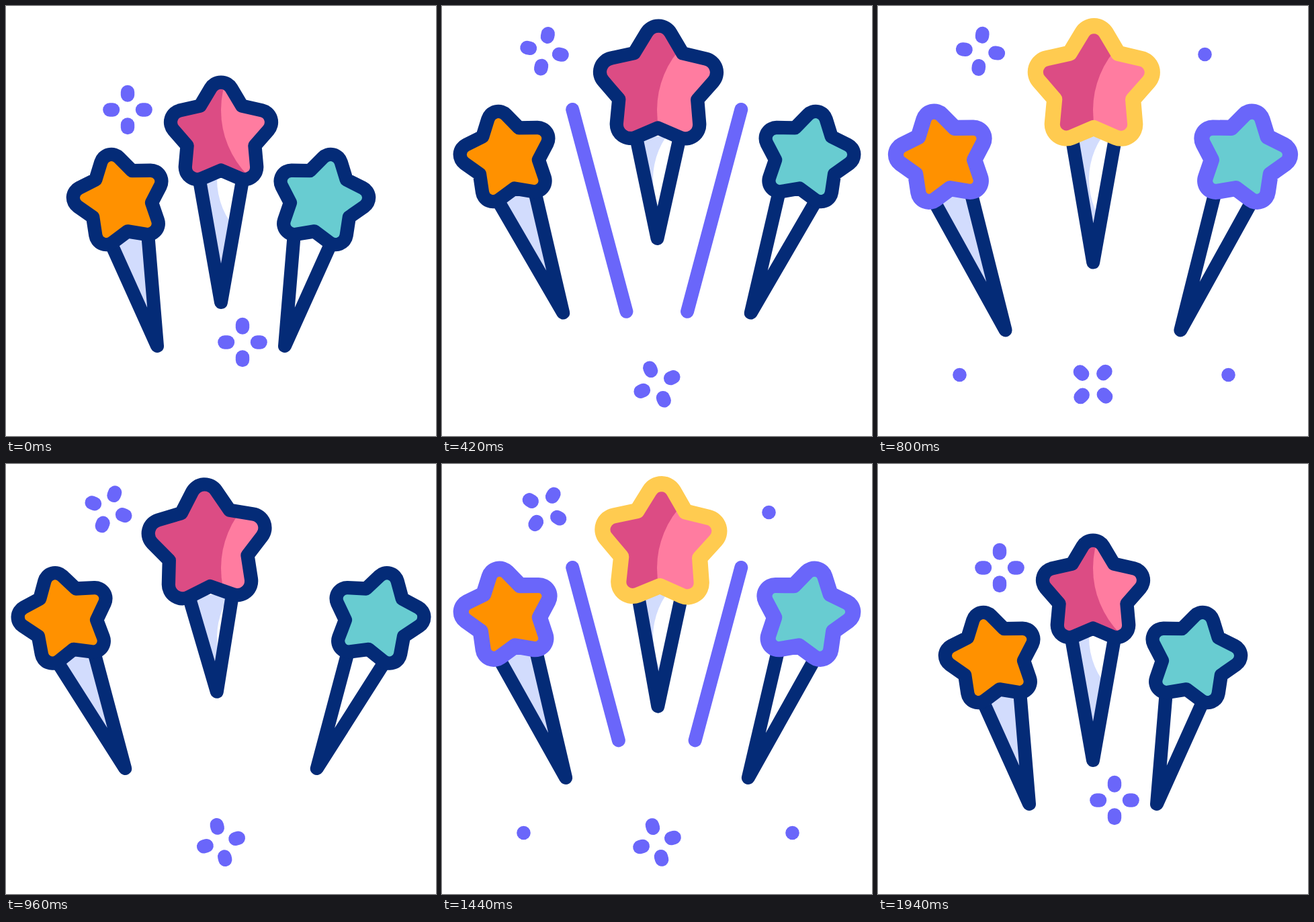
Write an HTML page that moves like this. It is 640x640 px and loops after 2280 ms.

```html
<!DOCTYPE html>
<html lang="en">
<head>
<meta charset="utf-8">
<title>Fireworks</title>
<style>
  html, body { margin: 0; width: 100%; height: 100%; overflow: hidden; background: #fff; }
  svg { display: block; width: 100%; height: 100%; }
</style>
</head>
<body>
<svg id="stage" viewBox="0 0 640 640" stroke-linecap="round" stroke-linejoin="round"></svg>
<script>
const LOOP = 2280, STEP = 20;
const NAVY = '#042b77', VIOLET = '#6a66fa', YELLOW = '#ffcb50', LAVENDER = '#d2dcfd';
const stage = document.getElementById('stage');

function add(parent, tag, attrs = {}) {
  const node = document.createElementNS('http://www.w3.org/2000/svg', tag);
  set(node, attrs);
  parent.appendChild(node);
  return node;
}
function set(node, attrs) {
  for (const key in attrs) node.setAttribute(key, attrs[key]);
}

const mix = (a, b, u) => a + (b - a) * u;
const clamp = u => Math.min(1, Math.max(0, u));
const ease = u => { u = clamp(u); return u * u * (3 - 2 * u); };
const ramp = (t, from, to) => ease((t - from) / (to - from));

// Eased values at evenly spaced keys.
function track(t, start, gap, values) {
  const pos = Math.min(values.length - 1, Math.max(0, (t - start) / gap));
  const i = Math.min(values.length - 2, Math.floor(pos));
  return mix(values[i], values[i + 1], ease(pos - i));
}

// Smooth curve through [time, value] keys, resting at both ends.
function curve(t, keys) {
  const last = keys.length - 1;
  if (t <= keys[0][0]) return keys[0][1];
  if (t >= keys[last][0]) return keys[last][1];
  const slope = i => i === 0 || i === last ? 0
    : (keys[i + 1][1] - keys[i - 1][1]) / (keys[i + 1][0] - keys[i - 1][0]);
  const i = keys.findIndex(k => k[0] > t) - 1;
  const [t0, v0] = keys[i], [t1, v1] = keys[i + 1];
  const d = t1 - t0, u = (t - t0) / d, s = ease(u);
  return mix(v0, v1, s) + d * u * (1 - u) * ((1 - u) * slope(i) - u * slope(i + 1));
}

function rotate([x, y], degrees, [cx, cy]) {
  const a = degrees * Math.PI / 180, c = Math.cos(a), s = Math.sin(a);
  return [cx + (x - cx) * c - (y - cy) * s, cy + (x - cx) * s + (y - cy) * c];
}
const at = p => p.map(v => v.toFixed(2)).join(' ');

// Five-pointed star with rounded tips; place() maps local points to the stage.
function starPath(scale, place) {
  const vertex = k => {
    const r = (k % 2 ? 53 : 95) * scale, a = k * Math.PI / 5;
    return [r * Math.sin(a), -r * Math.cos(a)];
  };
  const between = (p, q) => place([mix(p[0], q[0], .495), mix(p[1], q[1], .495)]);
  const r = 18 * scale;
  let d = '';
  for (let k = 0; k < 10; k += 2) {
    const tip = vertex(k), next = vertex(k + 1);
    d += `${k ? 'L' : 'M'}${at(between(tip, vertex(k + 9)))}` +
      `A${r} ${r} 0 0 1 ${at(between(tip, next))}L${at(place(next))}`;
  }
  return d + 'Z';
}

function makeRocket(spec) {
  const group = add(stage, 'g', spec.mirror ? { transform: 'matrix(-1 0 0 1 640 0)' } : {});
  const shine = (id, circle) => {
    if (!spec.shiny) return null;
    const clip = add(add(group, 'clipPath', { id }), 'path');
    add(add(group, 'g', { 'clip-path': `url(#${id})` }), 'circle', circle);
    return clip;
  };
  const cone = add(group, 'path', { fill: spec.cone });
  const coneClip = shine('coneClip', { cx: 427, cy: 258, r: 113, fill: '#fff' });
  const stick = add(group, 'path', { fill: 'none', stroke: NAVY, 'stroke-width': 20 });
  const star = add(group, 'path', { fill: spec.color });
  const starClip = shine('starClip', { cx: 458, cy: 155, r: 138, fill: '#ff7ca0' });
  const rim = add(group, 'path', { fill: 'none' });

  return (out, swing, stretch, lit) => {
    const v = ([a, b]) => mix(a, b, out);
    const center = [v(spec.x), v(spec.y)], scale = v(spec.scale);
    const sway = p => rotate(p, spec.swing * swing, spec.pivot);
    const place = ([x, y]) => sway(rotate([center[0] + x, center[1] + y], spec.tilt, center));
    // The stick hangs from the star, its lower end moves on its own.
    const end = sway([
      v(spec.endX) + spec.pull[0] * stretch,
      v(spec.endY) + spec.pull[1] * stretch
    ]);
    const gap = spec.gap * scale;
    const stickD = 'M' + [place([-spec.half, gap]), end, place([spec.half, gap])].map(at).join('L');
    const starD = starPath(scale, place);
    for (const node of [cone, stick, coneClip]) if (node) set(node, { d: stickD });
    for (const node of [star, rim, starClip]) if (node) set(node, { d: starD });
    set(rim, { stroke: lit ? spec.glow : NAVY, 'stroke-width': lit ? 23.2 : 20.3 });
  };
}

function makeSparkle(from, to, spin) {
  const group = add(stage, 'g', { fill: VIOLET });
  for (let k = 0; k < 4; k++)
    add(group, 'rect', { x: -10.2, y: -36.8, width: 20.4, height: 25, rx: 10.2, transform: `rotate(${k * 90})` });
  return (t, out) => {
    const x = mix(from[0], to[0], out), y = mix(from[1], to[1], out);
    set(group, { transform: `translate(${x} ${y}) rotate(${spin(t)})` });
  };
}

const side = {
  x: [169.6, 95.7], y: [289.2, 225.7], tilt: -13.8, scale: [.897, .897],
  endX: [225, 178.1], endY: [506, 451.3], pull: [21.7, 58.8], gap: 64.5, half: 28.5,
  swing: 1.85, pivot: [227, 482], glow: VIOLET
};
const rockets = [
  { ...side, color: '#ff9100', cone: LAVENDER },
  { ...side, color: '#68ccd1', cone: '#fff', mirror: true },
  { x: [320, 320], y: [191.5, 120], tilt: 0, scale: [1, 1.16],
    endX: [320, 320], endY: [441, 338.5], pull: [0, 81], gap: 64, half: 32.7,
    swing: 3.65, pivot: [320, 436], glow: YELLOW,
    color: '#dc4c84', cone: LAVENDER, shiny: true }
].map(makeRocket);

const sparkles = [
  makeSparkle([181, 154.5], [152.5, 67.3],
    t => curve(t, [[365, 0], [420, 11.6], [660, 180], [960, 381.4], [1440, 661.7], [1600, 720]])),
  makeSparkle([352, 500.5], [320, 563], t => 720 * ramp(t, 157, 1563))
];

const trails = [0, 1].map(right => add(stage, 'line', {
  stroke: VIOLET, 'stroke-width': 20, transform: right ? 'matrix(-1 0 0 1 639.5 0)' : 'translate(0 0)'
}));
const dots = add(stage, 'g', { fill: VIOLET });
for (const [cx, cy] of [[486.5, 72], [121.5, 549], [521.5, 549]])
  add(dots, 'circle', { cx, cy, r: 10.3 });

// The head of a trail climbs first, then its tail follows.
function drawTrails(t) {
  const start = t < 900 ? 70 : 1055;
  const head = ramp(t, start, start + 295), tail = ramp(t, start + 295, start + 590);
  const visible = head > 0 && tail < 1;
  for (const line of trails) set(line, {
    x1: mix(282.5, 194.2, head), y1: mix(485, 154, head),
    x2: mix(282.5, 194.2, tail), y2: mix(485, 154, tail),
    visibility: visible ? 'visible' : 'hidden'
  });
}

function draw(t) {
  const out = ramp(t, 0, 390) - ramp(t, 1548, 1940);
  const swing = track(t, 365, 294, [0, 1, -1, 1, 0]);
  const stretch = track(t, 365, 294, [0, 1, 0, 1, 0]);
  const lit = (t >= 560 && t < 950) || (t >= 1150 && t < 1540);
  for (const rocket of rockets) rocket(out, swing, stretch, lit);
  for (const sparkle of sparkles) sparkle(t, out);
  drawTrails(t);
  set(dots, { visibility: lit ? 'visible' : 'hidden' });
}

const begin = performance.now();
function tick() {
  const t = (performance.now() - begin) % LOOP;
  draw(Math.floor(t / STEP) * STEP);
  requestAnimationFrame(tick);
}
tick();
</script>
</body>
</html>
```
